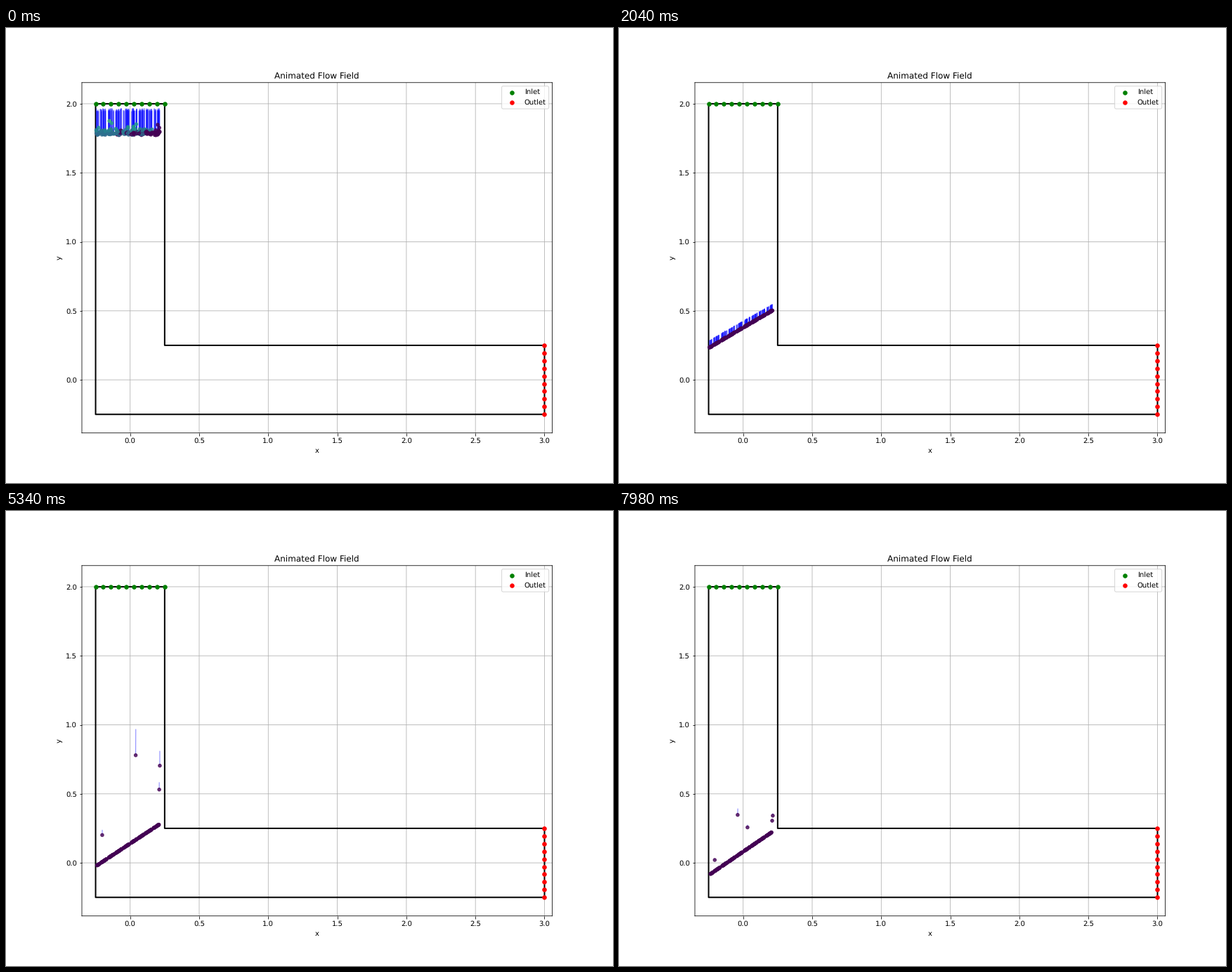
Recreate the animation shown at these times as a matplotlib script. Size 864x648 px, loop 8 s.

```python
import numpy as np
import matplotlib.pyplot as plt
from matplotlib.animation import FuncAnimation
from matplotlib.collections import LineCollection

FRAMES, INTERVAL = 250, 32
STEP = 30            # simulation step in ms
TRAIL = 9 * STEP     # length of the visible path in ms
PER_PORT = 25

plt.rcParams.update({
    "font.family": "DejaVu Sans",
    "text.hinting": "no_hinting",
    "path.snap": False,
})
fig, ax = plt.subplots(figsize=(12, 9), dpi=72)

# Channel walls, inlet and outlet
ax.plot([-0.25, -0.25, 3, 3, 0.25, 0.25, -0.25],
        [2, -0.25, -0.25, 0.25, 0.25, 2, 2], color="black", lw=2)
ports = np.linspace(-0.25, 0.25, 10)
ax.scatter(ports, np.full(10, 2.0), s=30, color="green", label="Inlet", zorder=5)
ax.scatter(np.full(10, 3.0), ports, s=30, color="red", label="Outlet", zorder=5)

ax.set_xlim(-0.3494, 3.0565)
ax.set_ylim(-0.3846, 2.1533)
ax.set_title("Animated Flow Field")
ax.set_xlabel("x")
ax.set_ylabel("y")
ax.grid(True)
ax.legend(loc="upper right")

# Swarm clustered below the inlet points
rng = np.random.default_rng(7)
x_swarm = (ports[:9, None] + rng.uniform(-0.022, 0.022, (9, PER_PORT))).ravel()
x_swarm = x_swarm[(x_swarm > -0.247) & (x_swarm < 0.218)]
n = len(x_swarm)

# Single particles that enter later
t_late = np.array([2.84, 3.42, 4.12, 4.50, 5.81])
x_late = np.array([-0.199, 0.211, 0.215, 0.043, -0.032])

x0 = np.r_[x_swarm, x_late]
u = (x0 + 0.246) / 0.463             # 0 at the left wall, 1 at the right
late = np.arange(len(x0)) >= n
fresh = np.where(rng.random(len(x0)) < 0.2,
                 0.1 + rng.exponential(0.13, len(x0)),
                 rng.uniform(0, 0.1, len(x0))).clip(0, 0.95)

born = -(0.048 + 0.013 * u) * (1 - fresh)
born[late] = t_late
top = rng.uniform(1.945, 1.968, len(x0))
floor = -0.22 + 0.315 * u
lag = 0.55 + 0.04 * u
drift = np.where(late, -0.014 * u * (1 - u), -0.005 * x0)

# Left and freshly entered particles start bright
bright = (rng.random(len(x0)) < 1.25 - 1.5 * u) | ((fresh > 0.1) & (u < 0.88))
shade = np.where(bright & ~late, 0.34 + 0.6 * fresh, 0)


def position(t):
    """Particles slow down hyperbolically towards their own floor."""
    age = np.maximum(t - born, 0)
    x = x0 + drift * (t - np.maximum(born, 0))
    return np.c_[x, floor + (top - floor) * lag / (lag + age)]


trails = LineCollection([], colors="blue", linewidths=1, alpha=0.5, zorder=3)
ax.add_collection(trails, autolim=False)
dots = ax.scatter(*position(0).T, c=shade, s=20, cmap="viridis",
                  vmin=0, vmax=1, alpha=0.8, zorder=4)


def update(i):
    t = -(-i * INTERVAL // STEP) * STEP / 1000
    on = t >= born
    head = position(t)[on]
    tail = position(t - TRAIL / 1000)[on]
    trails.set_segments(np.stack([tail, head], axis=1))
    dots.set_offsets(head)
    dots.set_array(shade[on] * np.exp(-t / 0.2))
    return trails, dots


anim = FuncAnimation(fig, update, frames=FRAMES, interval=INTERVAL,
                     init_func=lambda: update(0), repeat=True, repeat_delay=0)
plt.show()
```
